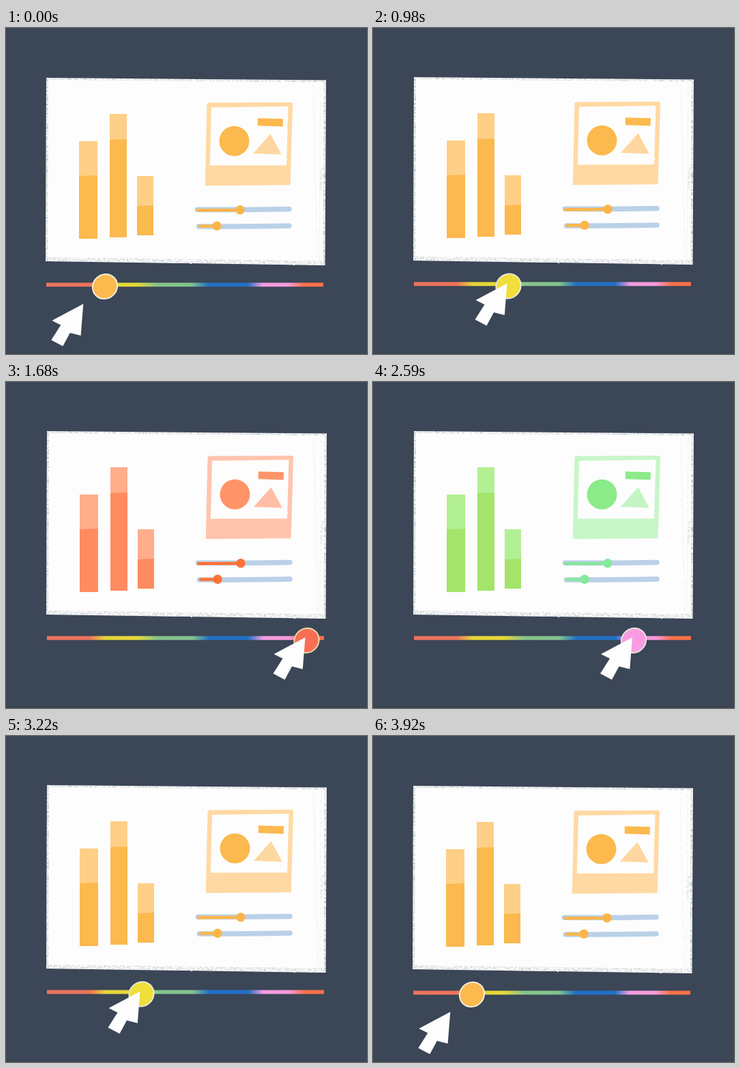
Animation, 529 px wide and 478 px high, one loop 4200 ms. Source, as an HTML page:

```html
<!DOCTYPE html>
<html lang="en">
<head>
<meta charset="utf-8">
<title>Colour slider</title>
<style>
  html, body { margin: 0; width: 100%; height: 100%; overflow: hidden; background: #3b4656; }
  svg { display: block; width: 529px; height: 478px; }
  .bar { fill: var(--bar); }
  .cap { fill: var(--cap); }
  .frame { fill: var(--frame); }
  .shape { fill: var(--shape); }
  .tri { fill: var(--tri); }
  .dot { fill: var(--dot); }
  .rail, .level { fill: none; stroke-linecap: round; }
  .rail { stroke: #bad1e8; stroke-width: 7.6; }
  .level { stroke: var(--dot); stroke-width: 4.4; }
  .grain { fill: none; stroke: #a9aeb6; }
</style>
</head>
<body>
<svg viewBox="0 0 529 478" xmlns="http://www.w3.org/2000/svg">
  <defs>
    <filter id="rough" filterUnits="userSpaceOnUse" x="0" y="0" width="529" height="478" color-interpolation-filters="sRGB">
      <feTurbulence type="fractalNoise" baseFrequency=".2" numOctaves="2" seed="4"/>
      <feDisplacementMap in="SourceGraphic" scale="1.6" xChannelSelector="R" yChannelSelector="G"/>
    </filter>
    <filter id="soft" filterUnits="userSpaceOnUse" x="0" y="0" width="529" height="478" color-interpolation-filters="sRGB">
      <feTurbulence type="fractalNoise" baseFrequency=".1" numOctaves="2" seed="9"/>
      <feDisplacementMap in="SourceGraphic" scale="1.4" xChannelSelector="R" yChannelSelector="G"/>
    </filter>
    <filter id="chalk" filterUnits="userSpaceOnUse" x="0" y="0" width="529" height="478" color-interpolation-filters="sRGB">
      <feTurbulence type="fractalNoise" baseFrequency=".35" numOctaves="3" seed="7"/>
      <feColorMatrix values="0 0 0 0 0  0 0 0 0 0  0 0 0 0 0  3 0 0 0 -1.15"/>
      <feComposite in="SourceGraphic" operator="in"/>
    </filter>
    <linearGradient id="hues" gradientUnits="userSpaceOnUse" x1="59" y1="0" x2="465" y2="0"></linearGradient>
  </defs>

  <rect width="529" height="478" fill="#3b4656"/>
  <rect y="477" width="529" height="1" fill="#3c4148"/>

  <g id="scene">
    <path d="M59 73L469 76.500L467.500 348L58 342Z" fill="#fdfdfd" filter="url(#rough)"/>
    <g class="grain" filter="url(#chalk)">
      <path d="M60 74.500L468 78" stroke-width="3" opacity=".6"/>
      <path d="M60.500 74L59.500 341" stroke-width="3" opacity=".75"/>
      <path d="M59 339L466 344.500" stroke-width="6" opacity=".5"/>
      <path d="M467 78L466 346" stroke-width="3" opacity=".75"/>
      <path d="M450 82L456 340" stroke-width="1.3" opacity=".25"/>
      <path d="M461 80L459 342" stroke-width="1.5" opacity=".2"/>
      <path d="M463 205L461 238" stroke-width="3" opacity=".45"/>
    </g>

    <g id="bars"></g>

    <g filter="url(#soft)">
      <path class="frame" fill-rule="evenodd" d="M297 109.500L418.500 109Q420.500 109.500 420 112L416.700 230.300L291.700 231.300L294.500 111ZM301 116.500L298.800 201.500L411 201.200L413.500 115Z"/>
      <circle class="shape" cx="334.500" cy="165.800" r="22"/>
      <path class="shape" d="M368.800 132.300L406 133.300L405.700 144.500L368.800 143.300Z"/>
      <path class="tri" d="M387.500 155.300L403.800 185.500L362 184Z"/>
      <path class="rail" d="M280.500 266.200Q345 266.700 415 265.500"/>
      <path class="rail" d="M282.500 291Q345 291.300 415 290"/>
      <path class="level" d="M281 267.200L343 267"/>
      <path class="level" d="M284 290.500L309 290.500"/>
      <circle class="dot" cx="343" cy="266.800" r="6.700"/>
      <circle class="dot" cx="309" cy="290.300" r="6.700"/>
    </g>

    <rect x="59" y="373.500" width="406" height="5.800" fill="url(#hues)"/>
  </g>

  <g id="knob">
    <ellipse rx="18.700" ry="17.500" transform="rotate(-45)" stroke-width="2"/>
  </g>
  <path id="arrow" fill="#fdfdfd" d="M0 0L-46 24.300L-33 31L-47 52.800L-30 62L-19.500 42.300L-3.700 46.500Z"/>
</svg>
<script>
const LOOP = 4200;
const $ = id => document.getElementById(id);
const NS = 'http://www.w3.org/2000/svg';

function add(parent, tag, attrs) {
  const el = document.createElementNS(NS, tag);
  for (const k in attrs) el.setAttribute(k, attrs[k]);
  parent.append(el);
}

// x, width, top, split, bottom
for (const [x, w, top, split, end] of [
  [107, 27, 166, 216.5, 309],
  [152, 25, 126, 163.5, 307],
  [192, 24, 217, 260.5, 304]
]) {
  add($('bars'), 'rect', { class: 'cap', x, y: top, width: w, height: end - top });
  add($('bars'), 'path', { class: 'bar', d: `M${x} ${split + .6}L${x + w} ${split - .6}V${end}H${x}Z` });
}

for (const [x, color] of [
  [59, '#ea7460'], [122, '#ec7459'], [145, '#e6d639'], [192, '#e4d83a'],
  [222, '#85c48b'], [272, '#83c38e'], [297, '#2170c6'], [354, '#2170c6'],
  [376, '#f79ce0'], [414, '#f59ada'], [436, '#f8714a'], [465, '#f8714a']
]) add($('hues'), 'stop', { offset: (x - 59) / 406, 'stop-color': color });

const themes = {
  orange: { bar: '#fbb94e', cap: '#fecf86', frame: '#ffd9a3', shape: '#fbb94e', tri: '#fed7a0', dot: '#fbb54a' },
  green: { bar: '#a4e46a', cap: '#b3f094', frame: '#c7f6c7', shape: '#8beb88', tri: '#c3f4c3', dot: '#86e89a' },
  red: { bar: '#ff8b61', cap: '#ffad8b', frame: '#ffc4ad', shape: '#ff9468', tri: '#ffbda5', dot: '#ff7136' }
};

// knob x, y, fill, ring, theme
const stops = {
  orange: [145, 379, '#fbb94e', '#f3eddc', 'orange'],
  yellow: [198.5, 378.5, '#f0de3a', '#e9e8d6', 'orange'],
  green: [257, 378.5, '#8ae886', '#eeeedd', 'green'],
  blue: [316, 378.5, '#2a90ff', '#eeeadb', 'green'],
  pink: [382, 379, '#f99ce2', '#e9e6d8', 'green'],
  red: [440.5, 379, '#f86f55', '#ead8a8', 'red']
};

// start time, slider stop, how far the arrow has come to the knob
const steps = [
  [0, 'orange', 0], [350, 'orange', 1 / 3], [420, 'orange', 2 / 3], [490, 'orange', 1],
  [980, 'yellow', 1], [1050, 'green', 1],
  [1540, 'blue', 1], [1610, 'pink', 1], [1680, 'red', 1],
  [2590, 'pink', 1], [2660, 'blue', 1], [2730, 'green', 1],
  [3220, 'yellow', 1], [3290, 'orange', 1],
  [3780, 'orange', 2 / 3], [3850, 'orange', 1 / 3], [3920, 'orange', 0]
];

const move = (el, x, y) => el.setAttribute('transform', `translate(${x} ${y})`);
const mix = (a, b, t) => a + (b - a) * t;

let shown = null;
function show(step) {
  const [, name, reach] = step;
  const [x, y, fill, ring, theme] = stops[name];
  const shift = name === 'orange' ? 0 : 1;
  move($('scene'), shift, -shift);
  move($('knob'), x, y);
  $('knob').setAttribute('fill', fill);
  $('knob').setAttribute('stroke', ring);
  move($('arrow'), mix(113.3, x - 2, reach), mix(404.6, 374.6, reach));
  for (const k in themes[theme]) $('scene').style.setProperty('--' + k, themes[theme][k]);
}

const start = performance.now();
function tick(now) {
  const t = Math.max(0, now - start) % LOOP;
  const step = steps.findLast(s => s[0] <= t);
  if (step !== shown) show(shown = step);
  requestAnimationFrame(tick);
}
show(shown = steps[0]);
requestAnimationFrame(tick);
</script>
</body>
</html>
```
